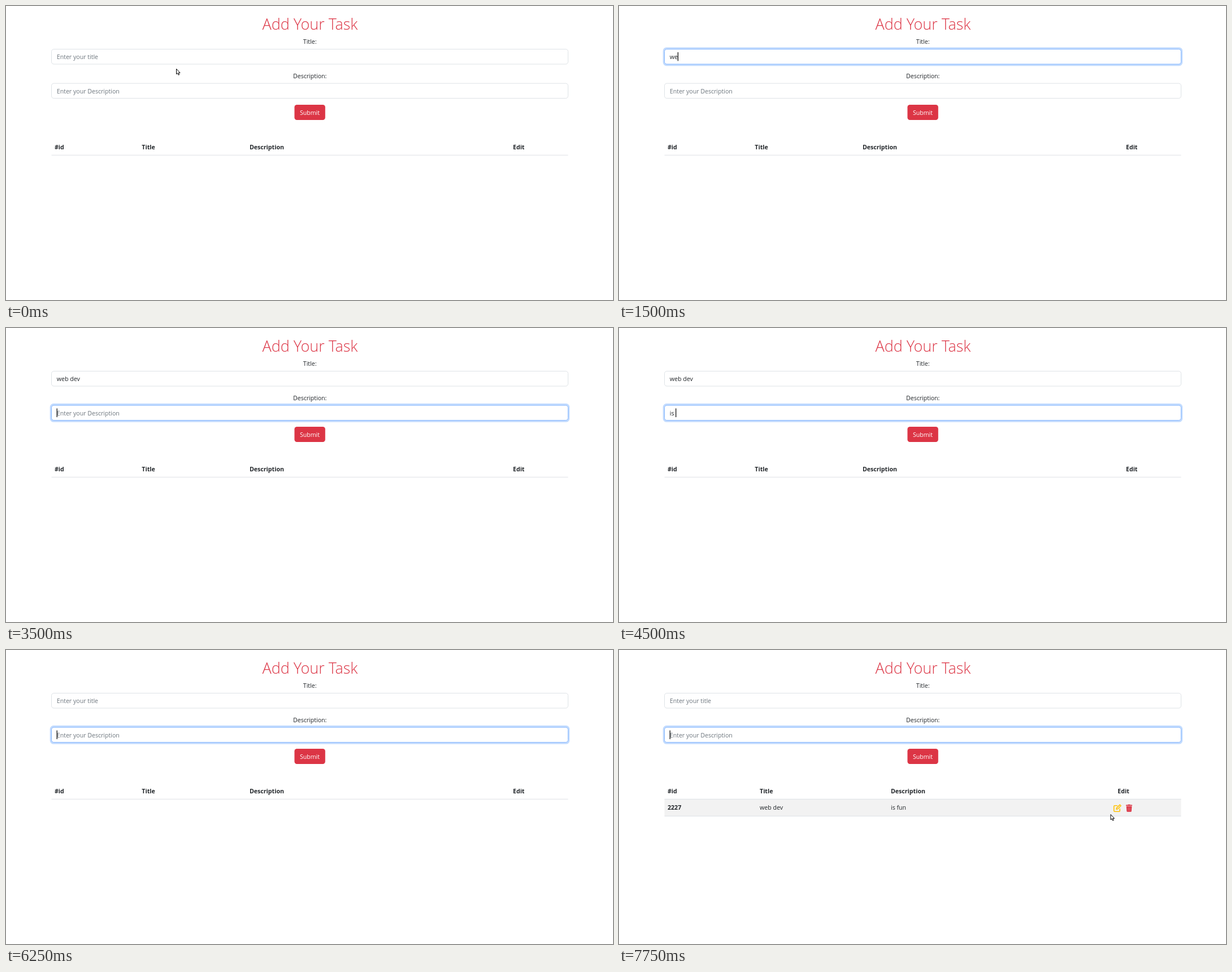
Animation of 1074x521 px, one loop 8 s. Source, as an HTML page:

```html
<!DOCTYPE html>
<html lang="en">
<head>
<meta charset="utf-8">
<title>Add Your Task</title>
<style>
  html, body { margin: 0; width: 100%; height: 100%; overflow: hidden; background: #fff; }
  svg { display: block; width: 100%; height: 100%; }
  text { font: 10.6px "Open Sans", "Noto Sans", sans-serif; fill: #212529; white-space: pre; }
  .head { font-size: 26.9px; font-weight: 300; fill: #dc3545; }
  .mid { text-anchor: middle; }
  .bold { font-weight: 700; }
  .hint { fill: #6c757d; }
  .field { fill: #fff; stroke: #dee2e6; }
  .focus .field { stroke: #86b7fe; }
  .ring { fill: #c2dbfe; visibility: hidden; }
  .focus .ring { visibility: visible; }
  .line { stroke: #dee2e6; }
</style>
</head>
<body>
<svg viewBox="0 0 1074 521">
  <text class="head mid" x="538" y="42.3">Add Your Task</text>
  <text class="mid" x="537.7" y="66.5">Title:</text>
  <text class="mid" x="537.7" y="127.5">Description:</text>
  <g id="title"></g>
  <g id="desc"></g>
  <rect id="caret" width="1.2" height="15.5" fill="#000"/>

  <rect x="510.4" y="175" width="54.4" height="27" rx="4.2" fill="#dc3545"/>
  <text class="mid" x="537.5" y="192.7" style="fill:#fff">Submit</text>

  <rect id="band" x="77" y="243" width="920" height="55" fill="#f9f9f9"/>
  <g id="heads"></g>
  <g id="row">
    <rect x="80.5" y="264" width="914" height="30.5" fill="#f2f2f2"/>
    <path class="line" d="M80.5 294.3H994.5"/>
    <text class="bold" x="86" y="283.2">2227</text>
    <text x="249" y="283.2">web dev</text>
    <text x="481" y="283.2">is fun</text>
    <g fill="none" stroke="#ffc107" stroke-width="1.6" stroke-linecap="round" stroke-linejoin="round">
      <path d="M881.5 275.7H877.3Q875.7 275.7 875.7 277.3V284.7Q875.7 286.2 877.3 286.2H884.7Q886.2 286.2 886.2 284.7V281.5"/>
      <path d="M880 282.3L880.5 279.8L886.3 274.2L888.1 276L882.4 281.8Z"/>
    </g>
    <path fill="#dc3545" d="M897 274.6H900L900.8 273.7H904.2L905 274.6H908V276.3H897ZM897.7 277.1H907.4L906.8 285.5Q906.7 286.8 905.5 286.8H899.6Q898.4 286.8 898.3 285.5Z"/>
    <path stroke="#f2f2f2" stroke-opacity=".35" stroke-width=".8" d="M900.3 278.6V285M902.5 278.6V285M904.8 278.6V285"/>
  </g>
  <path class="line" d="M80.5 264.3H994.5"/>
  <path id="beam" fill="none" stroke="#000" d="M299.5 91.5H301L302 92.5L303 91.5H304.5M302 92.5V102.5M299.5 103.5H301L302 102.5L303 103.5H304.5"/>
  <path id="arrow" fill="#fff" stroke="#000" stroke-linejoin="round" d="M.5 .5V9.8L2.6 7.9L4.1 11.3L5.7 10.6L4.2 7.4H7Z"/>
</svg>
<script>
const LOOP = 8000, STEP = 250;
const $ = id => document.getElementById(id);
const show = (el, on) => el.setAttribute("visibility", on ? "visible" : "hidden");
const within = (t, from, to) => t >= from && t < to;

function makeField(id, y, hint) {
  const box = $(id);
  box.innerHTML = `<rect class="ring" x="77.7" y="${y - 3.3}" width="919.6" height="33" rx="6.5"/>
    <rect class="field" x="80.5" y="${y}" width="914" height="26.5" rx="4.2"/>
    <text x="89.8" y="${y + 17.6}"></text>`;
  const text = box.querySelector("text");
  return {
    y, text,
    set(value, focused) {
      box.classList.toggle("focus", focused);
      text.classList.toggle("hint", !value);
      text.textContent = value || hint;
      this.end = 89.6 + (value ? text.getComputedTextLength() : 0);
    }
  };
}

const title = makeField("title", 76.5, "Enter your title");
const desc = makeField("desc", 137.1, "Enter your Description");

const names = ["#id", "Title", "Description", "Edit"];
const emptyCols = [86, 240.3, 431, 897], filledCols = [86, 249, 481, 882.3];
$("heads").innerHTML = names.map(n => `<text class="bold" y="254.3">${n}</text>`).join("");
const heads = [...$("heads").children];

// one key per step; a pause follows "web "
const typed = (word, start, t) => word.slice(0, Math.max(0, Math.floor((t - start) / STEP) + 1));
const titleAt = t => t >= 6250 ? "" : t < 2500 ? typed("web ", 1250, t) : "web " + typed("dev", 2500, t);
const descAt = t => t >= 6250 ? "" : typed("is fun", 4000, t);

function caretOn(t) {
  if (t < 500) return false;
  if (t < 1250) return t < 1000;
  return !within(t, 5750, 6250) && !within(t, 7000, 7500);
}

function arrowAt(t) {
  if (t < 250) return [301, 111];
  if (t >= 7750) return [869.5, 291];
  return t >= 7500 ? [831.5, 339] : null;
}

function draw(t) {
  const onDesc = t >= 3500, filled = t >= 6500;
  title.set(titleAt(t), t >= 500 && !onDesc);
  desc.set(descAt(t), onDesc);

  const active = onDesc ? desc : title;
  $("caret").setAttribute("x", active.end);
  $("caret").setAttribute("y", active.y + 5.4);
  show($("caret"), caretOn(t));

  heads.forEach((h, i) => h.setAttribute("x", (filled ? filledCols : emptyCols)[i]));
  show($("row"), filled);
  show($("band"), within(t, 6500, 7000));
  show($("beam"), within(t, 250, 1250));

  const pos = arrowAt(t);
  show($("arrow"), pos);
  if (pos) $("arrow").setAttribute("transform", `translate(${pos})`);
}

const begin = performance.now();
function tick(now) {
  draw(Math.max(0, now - begin) % LOOP);
  requestAnimationFrame(tick);
}
draw(0);
requestAnimationFrame(tick);
</script>
</body>
</html>
```
